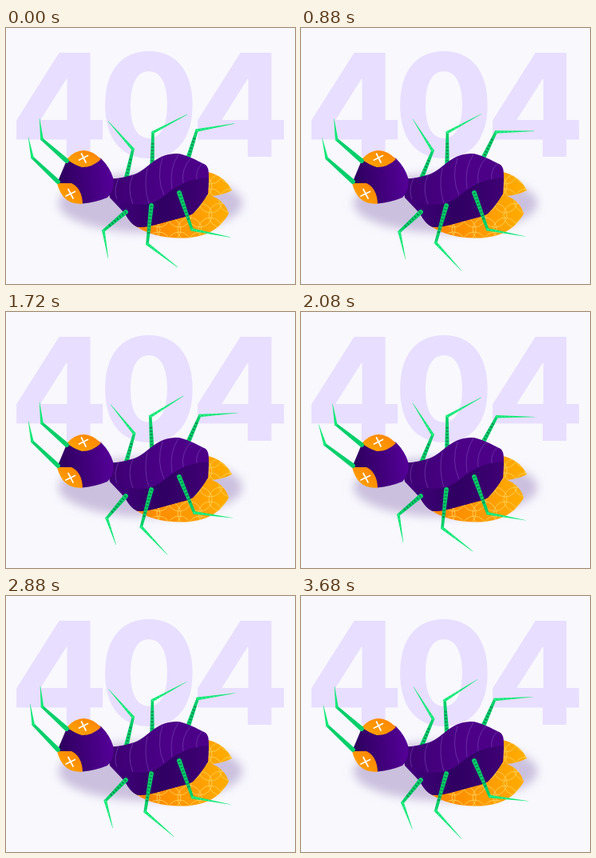
These frames come from a looping animation (362 by 320 pixels, 3720 ms). An HTML page:

```html
<!DOCTYPE html>
<html lang="en">
<head>
<meta charset="utf-8">
<title>404</title>
<style>
  html, body { margin: 0; width: 100%; height: 100%; overflow: hidden; background: #f8f8fd; }
  svg { display: block; width: 362px; height: 320px; }
  .code { font: 800 179px Inter, "Open Sans", sans-serif; fill: #e8deff; text-anchor: middle; }
  .scales { fill: none; stroke: #ffcf58; stroke-width: .9; }
  .ribs { fill: none; stroke: #7038a8; stroke-width: .8; }
  .cross { stroke: #fff; stroke-width: 1.7; stroke-linecap: round; }
  .thigh { fill: #06cf6a; }
  .shin { fill: #13e877; }
  .bands { stroke: #0a8a54; stroke-dasharray: 1.6 2.6; stroke-width: 3.2; }
  .ticks { stroke: #7dfab5; stroke-dasharray: 1 4; stroke-width: 1; }
</style>
</head>
<body>
<svg viewBox="0 0 362 320">
  <defs>
    <linearGradient id="wing"><stop offset="0" stop-color="#ff8200"/><stop offset="1" stop-color="#ffae00"/></linearGradient>
    <linearGradient id="eye" x1="0" y1="1" x2="1" y2="0"><stop offset="0" stop-color="#ffa800"/><stop offset="1" stop-color="#ff8000"/></linearGradient>
    <linearGradient id="head" x1="0" y1=".3" x2="1" y2=".2"><stop offset="0" stop-color="#2c005c"/><stop offset="1" stop-color="#56009a"/></linearGradient>
    <linearGradient id="back"><stop offset="0" stop-color="#3b0070"/><stop offset=".6" stop-color="#4c0088"/><stop offset="1" stop-color="#4c0088"/></linearGradient>
    <linearGradient id="belly"><stop offset="0" stop-color="#43007d"/><stop offset=".5" stop-color="#2f0062"/><stop offset="1" stop-color="#3f0074"/></linearGradient>
    <filter id="soft" x="-20%" y="-40%" width="140%" height="180%"><feGaussianBlur stdDeviation="6"/></filter>
    <path id="wings" d="M248 179Q273 183 283 203Q268 211 248 210ZM248 207Q273 212 279 232C268 252 250 261 225 262.500Q185 264 160 246Z"/>
    <clipPath id="wingClip"><use href="#wings"/></clipPath>
  </defs>

  <text class="code" y="161" x="66.500 179 293.500">404</text>
  <ellipse cx="181" cy="219" rx="115" ry="37" fill="#cbc0de" filter="url(#soft)"/>

  <use href="#wings" fill="url(#wing)"/>
  <g id="scales" class="scales" clip-path="url(#wingClip)"></g>
  <g id="behind"></g>

  <path fill="url(#back)" d="M126 188Q143 189 157 184C178 179 184 158 212 157C222 156 238 165 250 171Q254 174 254 184L253 207Q244 222 234 232Q229 235 220 237L187 246Q170 250 164 248.500Q156 245 149 232L130 212Z"/>
  <path fill="url(#belly)" d="M130 210C151 222 177 227 198 210C216 195 231 188 254 187L253 207Q244 222 234 232Q229 235 220 237L187 246Q170 250 164 248.500Q156 245 149 232Z"/>
  <path class="ribs" d="M141 188Q134 202 139 214M159 184Q151 200 159 220M177 175Q172 198 179 219M196 162Q188 187 198 209M216 158Q204 176 208 201M232 162Q219 176 222 194M246 169Q237 178 239 189"/>

  <path fill="url(#head)" d="M77 163Q98 155 119 163Q130 174 134 187Q137 202 127 212Q112 218 96 219.500Q73 210 64 194Z"/>
  <path fill="url(#eye)" d="M76 164Q97 142 119 164Q109 174 95 174Q85 171 76 164Z"/>
  <path fill="url(#eye)" d="M64 194H82Q95 200 96 219.500Q71 222 64 194Z"/>
  <path class="cross" d="M91.500 165L102.500 159.500M94.500 157L100 168M75 210L86.500 204.500M78 201.500L84 213"/>

  <g id="front"></g>
</svg>
<script>
const LOOP = 3720, STEP = 40;
const $ = id => document.getElementById(id);

function add(parent, tag, attrs) {
  const el = document.createElementNS('http://www.w3.org/2000/svg', tag);
  for (const key in attrs) el.setAttribute(key, attrs[key]);
  return parent.appendChild(el);
}

for (let row = 0; row < 6; row++)
  for (let col = 0; col < 6; col++)
    add($('scales'), 'circle', { cx: 152 + col * 26 + row % 2 * 13, cy: 180 + row * 18, r: 15 });

// tapered segment with rounded ends, r1 and r2 being half widths
function taper([x1, y1], [x2, y2], r1, r2) {
  const d = Math.hypot(x2 - x1, y2 - y1), nx = (y1 - y2) / d, ny = (x2 - x1) / d;
  const at = (x, y, r) => `${x + nx * r} ${y + ny * r}`;
  return `M${at(x1, y1, r1)}A${r1} ${r1} 0 0 1 ${at(x1, y1, -r1)}L${at(x2, y2, -r2)}A${r2} ${r2} 0 0 1 ${at(x2, y2, r2)}Z`;
}

const mix = (a, b, u) => a.map((p, i) => p + (b[i] - p) * u);

// eased to and fro, with the given share of the period spent going out
const sway = (period, rise) => t => {
  const u = t % period / period;
  return (1 - Math.cos(Math.PI * (u < rise ? u / rise : (1 - u) / (1 - rise)))) / 2;
};

const decay = (t, start, length, cycles) => {
  const u = (t - start) / length;
  return u > 0 && u < 1 ? 1.2 * (1 - u) * Math.sin(2 * Math.PI * cycles * u) : 0;
};
const twitch = t => decay(t, 0, 1120, 1.5) + decay(t, 1720, 1640, 1);

function limb(layer, base, knee, tip, degrees, motion) {
  const g = add($(layer), 'g', {});
  add(g, 'path', { class: 'thigh', d: taper(base, knee, 2.9, 1.7) });
  add(g, 'path', { class: 'shin', d: taper(knee, tip, 1.8, .2) });
  if (motion !== twitch) {
    add(g, 'path', { class: 'bands', d: `M${base}L${mix(base, knee, .75)}` });
    add(g, 'path', { class: 'ticks', d: `M${knee}L${mix(knee, tip, .5)}` });
  }
  return t => g.setAttribute('transform', `rotate(${degrees * motion(t)} ${base})`);
}

const limbs = [
  limb('behind', [150, 190], [159, 151.5], [128, 116.5], 10, sway(1480, .5)),
  limb('behind', [183, 175], [184, 130.5], [227, 108], -10.5, sway(1000, .35)),
  limb('behind', [228, 163], [239, 128], [286, 119.5], 11, sway(1350, .5)),
  limb('front', [150, 230], [122, 253.5], [128, 288], -11, sway(1040, .54)),
  limb('front', [182, 222], [177, 270], [215, 299], 10.5, sway(700, .3)),
  limb('front', [217, 206], [233, 252], [280.5, 261.5], -9, sway(1000, .36)),
  limb('front', [76, 166], [45, 139], [42, 113], -3, twitch),
  limb('front', [65, 192], [33, 162], [28, 136.5], -6.7, twitch),
];

function draw() {
  const t = Math.floor(performance.now() % LOOP / STEP) * STEP;
  for (const pose of limbs) pose(t);
  requestAnimationFrame(draw);
}
draw();
</script>
</body>
</html>
```
